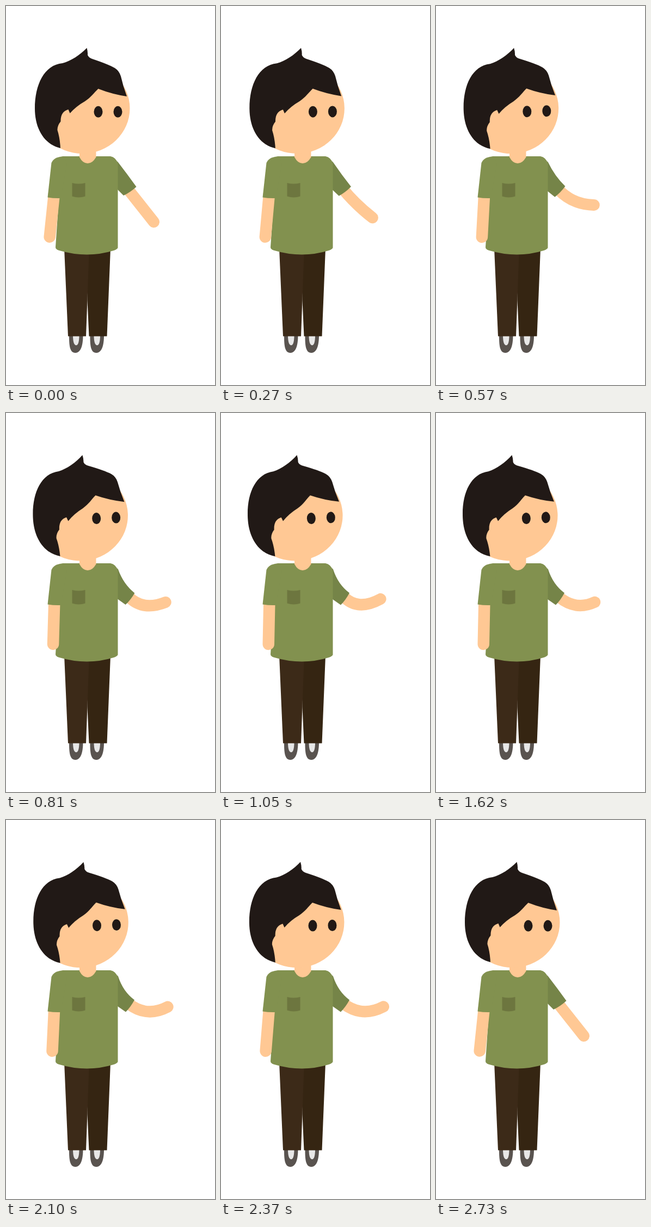
These frames come from a looping animation (384 px wide and 696 px high, 2.76 s). An HTML page:

```html
<!DOCTYPE html>
<html lang="en">
<head>
<meta charset="utf-8">
<title>Gesturing boy</title>
<style>
  html, body { margin: 0; width: 100%; height: 100%; overflow: hidden; background: #fff; }
  svg { display: block; width: 100%; height: 100%; }
  .skin { fill: #ffc894; }
  .limb { fill: none; stroke: #ffc894; stroke-linecap: round; }
  .hair { fill: #211916; }
  .shirt { fill: #82914f; }
</style>
</head>
<body>
<svg viewBox="0 0 384 696">
  <defs>
    <g id="shoe">
      <path fill="#59534f" d="M116 605 H141.5 C141.5 622 138 636.5 127.5 637 C116.5 637 116 622 116 605Z"/>
      <path fill="#e7e7e7" d="M123 605 H134.5 C134.5 615 133 623 129 623 C124.500 623 123 615 123 605Z"/>
    </g>
  </defs>
  <use href="#shoe"/>
  <use href="#shoe" x="38.500"/>
  <path fill="#352512" d="M150 445 H192 L185.500 606.500 H152.500 L149.500 540Z"/>
  <path fill="#3c2a18" d="M107 445 H153 L147 606.500 H114Z"/>

  <path id="fore" class="limb" stroke-width="21"/>
  <path id="sleeve" fill="#758448"/>

  <path class="shirt" d="M104 276 H192 Q202 278 205.500 289 V444 Q204 447 198 449 Q149 464 98 449 Q91 447 91 443 L98 340 L84 300 Z"/>
  <path id="arm" class="limb" stroke-width="21.500" d="M89 340 L80.200 424"/>
  <path class="shirt" d="M106 276 Q88 277 83.500 288 L76.500 351.500 Q88 353.500 100.500 353 L112 290Z"/>
  <path fill="#6d763f" d="M121.500 325 Q133.500 328 145.500 325 V349.500 Q133.500 353.500 121.500 349.500Z"/>
  <path class="skin" d="M135 262 H165.500 V277.500 Q159 289 150 289 Q141 289 135 277.500Z"/>

  <g id="head">
    <ellipse class="skin" cx="140.500" cy="188" rx="87" ry="83"/>
    <path class="hair" d="M100 261 C70 254 53 225 53 188 C53 145 70 108 104 105
      C119 101 136 90 148.500 77 Q150.500 84 150 90 Q152 95 158 97 Q188 107 200 114 Q208 119 211 129
      Q215 147 222 166 Q195 162 169.500 152 C161 160 157 167 145 175 Q129 184 117.500 197
      L114.500 190 Q100 194 100.500 212 Q94 220 94.500 228 Q99 242 100 261Z"/>
    <ellipse class="hair" cx="169.500" cy="194.300" rx="8" ry="10.500"/>
    <ellipse class="hair" cx="205.500" cy="194.300" rx="8" ry="10.500"/>
  </g>
</svg>
<script>
const LOOP = 2760, STEP = 30;
const $ = id => document.getElementById(id);
const head = $('head'), arm = $('arm'), fore = $('fore'), sleeve = $('sleeve');

// time, lift of the sleeve, reach and angle of the hand, bend point
const reachKeys = [
  [0, 0, 74.7, 51.5, 246.5, 365],
  [1020, 1, 68.2, 3, 252, 364],
  [1560, 1, 67.3, 8, 257, 363.5],
  [2340, 1, 73.7, 3, 260, 363],
  [2730, 0, 74.7, 51.5, 246.5, 365],
  [LOOP, 0, 74.7, 51.5, 246.5, 365]
];
const leanKeys = [[0, 0], [1020, 1], [1710, 1], [2730, 0], [LOOP, 0]];

const mix = (a, b, k) => a + (b - a) * k;
const ease = k => (1 - Math.cos(Math.PI * k)) / 2;

function sample(keys, t) {
  const i = keys.findIndex(key => key[0] > t);
  const a = keys[i - 1], b = keys[i];
  const k = ease((t - a[0]) / (b[0] - a[0]));
  return a.slice(1).map((v, n) => mix(v, b[n + 1], k));
}

function draw(t) {
  const [lean] = sample(leanKeys, t);
  head.setAttribute('transform', `rotate(${-2.6 * lean} 150 275)`);
  arm.setAttribute('transform', `rotate(${-4.8 * lean} 89 340)`);

  const [lift, reach, angle, bx, by] = sample(reachKeys, t);
  const a = angle * Math.PI / 180;
  const hx = 225 + reach * Math.cos(a), hy = 338 + reach * Math.sin(a);
  fore.setAttribute('d', `M${mix(222, 226, lift)} ${mix(334, 338, lift)} Q${bx} ${by} ${hx} ${hy}`);

  const cx = mix(239.5, 236, lift), cy = mix(332, 330.5, lift);
  const ux = mix(216, 220, lift), uy = mix(348, 352.5, lift);
  sleeve.setAttribute('d', `M204 285 L206 287 Q${mix(223, 215, lift)} ${mix(309, 315, lift)} ${cx} ${cy}
    Q${(cx + ux) / 2 + 1} ${(cy + uy) / 2 + 2} ${ux} ${uy} L205 ${mix(337, 342, lift)} H204Z`);
}

const start = performance.now();
function tick() {
  const t = (performance.now() - start) % LOOP;
  draw(Math.floor(t / STEP) * STEP);
  requestAnimationFrame(tick);
}
tick();
</script>
</body>
</html>
```
